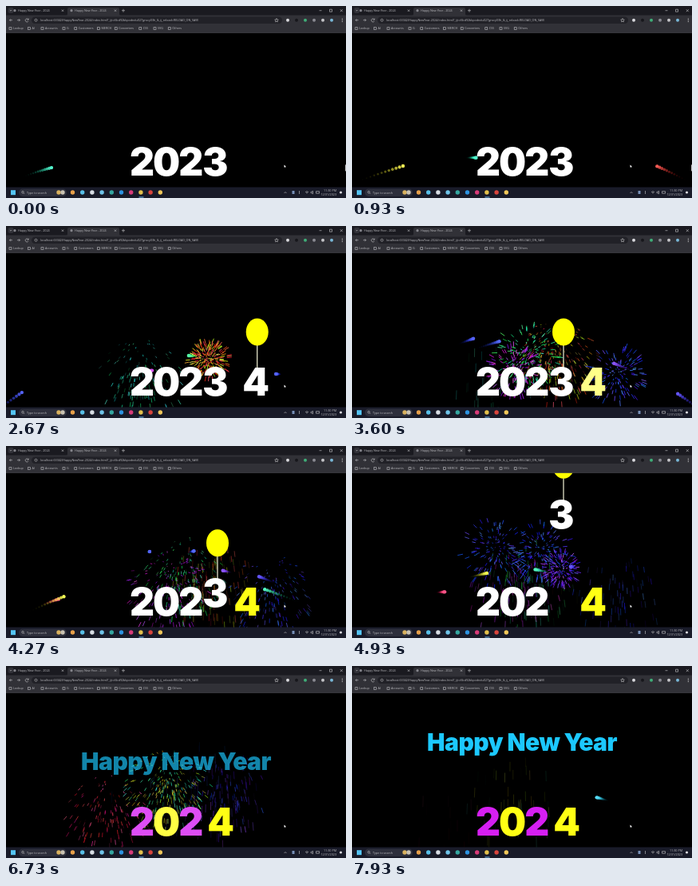
An HTML page with a canvas that plays this animation: 426 px wide and 240 px high, repeating every 8 s.

```html
<!DOCTYPE html>
<html lang="en">
<head>
<meta charset="utf-8">
<title>Happy New Year</title>
<style>
  html, body { margin: 0; width: 100%; height: 100%; overflow: hidden; background: #000; }
  canvas, svg { position: absolute; left: 0; top: 0; width: 100%; height: 100%; display: block; }
  text { font-family: "Open Sans", "Noto Sans", sans-serif; font-size: 3.7px; fill: #bcbcc0; }
  .big text { font: 900 48px Inter, sans-serif; text-anchor: middle; fill: #fff; }
  .big #wish { font-size: 30px; letter-spacing: -.55px; fill: #1cc8ff; }
  .line { fill: none; stroke: #b0b0b4; stroke-width: .7; }
</style>
</head>
<body>
<canvas id="sky" width="426" height="240"></canvas>
<svg viewBox="0 0 426 240" preserveAspectRatio="none">
  <g class="big">
    <text id="wish" x="213">Happy New Year</text>
    <g id="balloon">
      <path d="M0 149V178" stroke="#f4f4d8" stroke-width="1.2"/>
      <ellipse cy="132.5" rx="14" ry="17" fill="#ff0"/>
    </g>
    <g id="year"></g>
    <text id="four" y="212">4</text>
  </g>
  <path d="M348.5 198.5v3.2l.8-.7 .6 1.2.6-.3-.6-1.1h1z" fill="#fff"/>

  <g id="browser">
    <rect width="426" height="12" fill="#1a1a20"/>
    <rect y="11.5" width="426" height="22" fill="#313137"/>
    <path d="M75 12q2 0 2-2V4q0-2 2-2h61q2 0 2 2v6q0 2 2 2z" fill="#313137"/>
    <rect x="2.5" y="2" width="7" height="7" rx="2" fill="#303037"/>
    <path class="line" d="M4.800 5l1.200 1.200L7.200 5M69.800 4.500l2.400 2.400m0-2.400l-2.400 2.400M135.800 4.500l2.400 2.400m0-2.400l-2.400 2.400M145 5.700h4m-2-2v4M392.500 5.700h3M405.500 4.200h3v3h-3zM418.800 4.200l3 3m0-3l-3 3"/>
    <rect x="32" y="13.5" width="314" height="8.5" rx="4.2" fill="#212127"/>
    <path class="line" d="M8 17.700H4.500l1.500-1.500m-1.500 1.500l1.500 1.500M14 17.700h3.500l-1.500-1.500m1.500 1.500l-1.500 1.500M28 17a2 2 0 1 0 0 1.800M28.200 15.500v1.700h-1.700"/>
    <circle class="line" cx="37.5" cy="17.7" r="1.5"/>
    <text x="43" y="19.2">localhost:63342/HappyNewYear-2024/index.html?_ijt=i6bd92bkpodndu027gnscy03h_&amp;_ij_reload=RELOAD_ON_SAVE</text>
    <path class="line" d="M339 15.500l.7 1.500 1.600.2-1.200 1.100.3 1.600-1.400-.8-1.400.8.3-1.600-1.200-1.100 1.600-.2z"/>
    <path d="M421.3 15.500v1m0 .8v1m0 .8v1" stroke="#ccc"/>
    <g id="tabs"></g>
    <g id="tools"></g>
    <g id="marks"></g>
    <rect y="33" width="426" height=".7" fill="#434349"/>
  </g>

  <g id="taskbar">
    <rect y="226.5" width="426" height="13.5" fill="#191b29"/>
    <rect x="6" y="230.2" width="6" height="6" fill="#55c4f5"/>
    <rect x="16" y="228.5" width="60" height="9.5" rx="4.7" fill="#2d2f3c"/>
    <circle class="line" cx="21" cy="232.7" r="1.3"/>
    <path class="line" d="M22 233.700l1.200 1.200"/>
    <text x="26" y="234.7">Type to search</text>
    <g id="apps"></g>
    <rect x="166.5" y="238.5" width="6" height="1" fill="#6cb8f0"/>
    <path class="line" d="M348.500 234l1.500-1.500 1.500 1.500M367.500 231v4M375 232.700q2-2 4 0m-3 1.200q1-1 2 0M382 232.300h1l1.500-1v3.500l-1.500-1h-1zM388.500 231.700h4v2.500h-4z"/>
    <rect x="358.5" y="231" width="3" height="4" fill="#7790b8"/>
    <text x="414" y="232" text-anchor="end">11:30 PM</text>
    <text x="414" y="237" text-anchor="end">12/31/2023</text>
    <circle cx="419.5" cy="233" r="1.6" fill="#d8d8dc"/>
  </g>
</svg>
<script>
const W = 426, H = 240, LOOP = 8, FPS = 15;
const FLIGHT = 1.7, LAUNCH_Y = 222, ARC = 10, SPARKS = 150, REACH = 60;
const $ = id => document.getElementById(id);
const ctx = $('sky').getContext('2d');

const clamp = v => Math.max(0, Math.min(1, v));
const ramp = (t, a, b) => clamp((t - a) / (b - a));
const ease = (t, a, b) => {
  const p = ramp(t, a, b);
  return p < .5 ? 2 * p * p : 1 - 2 * (1 - p) ** 2;
};
const mix = (a, b, p) => a + (b - a) * p;
const tint = (rgb, p) => `rgb(${rgb.map(c => Math.round(mix(255, c, p)))})`;
const YELLOW = [255, 255, 20], MAGENTA = [214, 31, 242];

function seeded(seed) {
  return () => {
    seed = (seed + 0x6D2B79F5) | 0;
    let r = Math.imul(seed ^ seed >>> 15, 1 | seed);
    r ^= r + Math.imul(r ^ r >>> 7, 61 | r);
    return ((r ^ r >>> 14) >>> 0) / 4294967296;
  };
}

// A rocket flies in from one side and bursts at (x, y).
function firework(time, x, y, hue, fromLeft) {
  const rnd = seeded(time * 1000 + x);
  const sparks = Array.from({ length: SPARKS }, () => ({
    angle: rnd() * Math.PI * 2,
    reach: REACH * mix(.1, 1, rnd()),
    life: mix(1.3, 2.6, rnd()),
    hue: hue + mix(-22, 22, rnd()),
    light: mix(42, 66, rnd())
  }));
  return { time, x, y, hue, sparks, startX: fromLeft ? 0 : W };
}

const L = true, R = false;
const show = [
  firework(1.38, 167, 190, 165, L),
  firework(2.4, 250, 166, 58, L),
  firework(2.4, 255, 167, 2, R),
  firework(3.02, 220, 161, 150, R),
  firework(3.2, 203, 180, 290, L),
  firework(3.1, 332, 185, 235, R),
  firework(4.27, 180, 132, 235, L),
  firework(4.4, 237, 131, 232, L),
  firework(4.68, 262, 154, 260, R),
  firework(5.2, 270, 150, 245, R),
  firework(5.45, 128, 182, 342, L),
  firework(5.52, 203, 150, 160, R),
  firework(5.63, 203, 153, 62, L),
  firework(8.6, 285, 160, 190, R)
];

function rocketAt({ x, y, startX }, p) {
  const f = 1 - (1 - p) ** 2;
  return [mix(startX, x, f), mix(LAUNCH_Y, y, f) - 4 * ARC * f * (1 - f)];
}

function drawRocket(fw, p) {
  for (let i = 12; i >= 0; i--) {
    const [x, y] = rocketAt(fw, p - i * .01), k = 1 - i / 13;
    ctx.fillStyle = `hsla(${fw.hue},90%,${45 + 20 * k}%,${k * k})`;
    ctx.beginPath();
    ctx.arc(x, y, .6 + 1.6 * k, 0, 7);
    ctx.fill();
  }
}

function drawBurst({ x, y, sparks }, age) {
  for (const s of sparks) {
    const alpha = 1 - (age / s.life) ** 2;
    if (alpha <= 0) continue;
    const point = a => {
      const r = s.reach * (1 - Math.exp(-2.4 * a));
      return [x + Math.cos(s.angle) * r, y + Math.sin(s.angle) * r + 5 * a * a];
    };
    ctx.strokeStyle = `hsla(${s.hue},85%,${s.light}%,${alpha})`;
    ctx.beginPath();
    ctx.moveTo(...point(age * .75));
    ctx.lineTo(...point(age));
    ctx.stroke();
  }
}

function drawSky(t) {
  ctx.clearRect(0, 0, W, H);
  ctx.lineWidth = .9;
  ctx.lineCap = 'round';
  for (const fw of show) {
    const p = 1 + (t - fw.time) / FLIGHT;
    if (p > 1) drawBurst(fw, t - fw.time);
    else if (p > 0) drawRocket(fw, p);
  }
}

$('year').innerHTML = [...'2023'].map((d, i) =>
  `<text x="${170.5 + 30.6 * i}" y="212">${d}</text>`).join('');
const digits = [...$('year').children];

function drawScene(t) {
  const fourX = mix(440, 302, ease(t, 1.07, 3.07)) - 33 * ease(t, 5.1, 6.1);
  const lift = -225 * ease(t, 3.95, 5.95);
  const balloonX = t < 3.07 ? fourX + 1.5 : mix(303.5, 265, ease(t, 3.07, 3.6));
  $('balloon').setAttribute('transform', `translate(${balloonX} ${lift})`);
  $('four').setAttribute('x', fourX);
  $('four').style.fill = tint(YELLOW, ramp(t, 3.1, 4.1));

  const color = ramp(t, 5.7, 7);
  digits.forEach((d, i) => d.style.fill = tint(i % 2 ? YELLOW : MAGENTA, color));
  digits[3].setAttribute('transform', `translate(0 ${lift})`);
  digits[3].style.fill = '#fff';

  $('wish').setAttribute('y', mix(158.5, 105.5, ease(t, 5.7, 7.7)));
  $('wish').style.opacity = ease(t, 5.55, 7.55);
}

const row = (colors, x, step, y, r) => colors.split(' ').map((c, i) =>
  `<circle cx="${x + i * step}" cy="${y}" r="${r}" fill="${c}"/>`).join('');

$('tabs').innerHTML = [11, 82].map(x => `<circle cx="${x}" cy="5.7" r="1.6" fill="#85858c"/>
  <text x="${x + 4}" y="7.2">Happy New Year - 2024</text>`).join('');
$('tools').innerHTML = row('#d8d8dc #17171c #3fae78 #8a8a92 #c4c4c8 #79b8d8', 353, 11, 17.7, 2);
$('apps').innerHTML = row('#d9b25f #c9c2b4', 66, 5, 233, 2.7) +
  row('#e8a04a #58bfe8 #d8dde4 #6fc3e8 #35a6a0 #2d93e0 #d83a78 #e2c04a #d8443c #f2c85a', 83.5, 12.2, 233, 2.7);

let markX = 4;
for (const name of 'Lookup AI Accounts G Customers MERCH Converters CSS SVG Others'.split(' ')) {
  $('marks').innerHTML += `<rect class="line" x="${markX}" y="26.7" width="3" height="2.6"/>
    <text x="${markX + 5}" y="29.4">${name}</text>`;
  markX += 13 + 1.75 * name.length;
}

function frame(now) {
  const t = Math.floor((now / 1000 % LOOP) * FPS + .08) / FPS % LOOP;
  drawSky(t);
  drawScene(t);
  requestAnimationFrame(frame);
}
frame(0);
</script>
</body>
</html>
```
